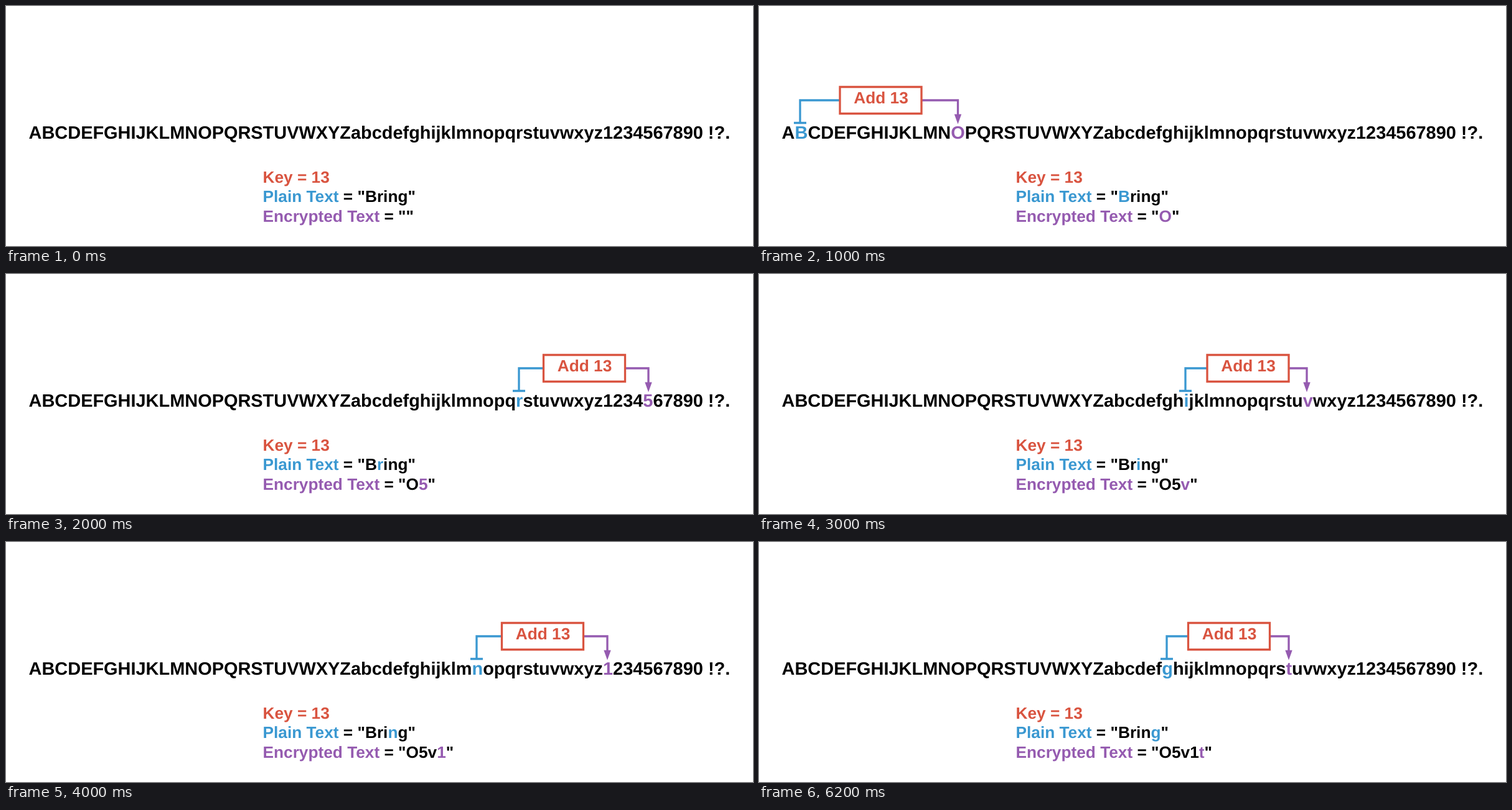
Recreate the animation shown at these times as an HTML page. Size 1200 by 387 pixels, loop 7 s.

```html
<!DOCTYPE html>
<html lang="en">
<head>
<meta charset="utf-8">
<title>Caesar cipher, key 13</title>
<style>
  :root { --red: #d95440; --blue: #3a98d1; --purple: #955bb0; }
  html, body { margin: 0; width: 100%; height: 100%; overflow: hidden; background: #fff; }
  svg { display: block; width: 100%; height: 100%; }
  text {
    font: bold 26.25px "Liberation Sans", Arial, sans-serif;
    text-rendering: geometricPrecision;
    white-space: pre;
  }
  .alphabet { font-size: 28.93px; }
  .red { fill: var(--red); }
  .blue { fill: var(--blue); }
  .purple { fill: var(--purple); }
  .line { fill: none; stroke-width: 3.3; }
  .line.red { stroke: var(--red); }
  .line.blue { stroke: var(--blue); }
  .line.purple { stroke: var(--purple); }
  .scene { visibility: hidden; animation: show 7s step-end infinite; }
  .scene:last-child { animation-name: hold; }
  @keyframes show { 0% { visibility: visible; } 14.28572%, 100% { visibility: hidden; } }
  @keyframes hold { 0% { visibility: visible; } 28.57143%, 100% { visibility: hidden; } }
</style>
</head>
<body>
<svg id="stage" viewBox="0 0 1200 387" preserveAspectRatio="none"></svg>
<script>
const ALPHABET = "ABCDEFGHIJKLMNOPQRSTUVWXYZabcdefghijklmnopqrstuvwxyz1234567890 !?.";
const KEY = 13;
const WORD = "Bring";
const LEFT = 412.5;

// Connector positions per letter: from, box left edge, to
const LINKS = [
  [66, 130, 319.5],
  [824, 863.5, 1032],
  [685, 720, 880],
  [756, 796.5, 966],
  [655, 689.5, 851]
];

const shift = c => ALPHABET[(ALPHABET.indexOf(c) + KEY) % ALPHABET.length];
const span = (color, s) => `<tspan class="${color}">${s}</tspan>`;
const text = (x, y, s, cls = "") => `<text x="${x}" y="${y}" class="${cls}">${s}</text>`;
const line = (color, d) => `<path class="line ${color}" d="${d}"/>`;

function mark(s, colors) {
  return [...s].map((c, i) => colors[i] ? span(colors[i], c) : c).join("");
}

function link([from, box, to]) {
  return line("blue", `M${box} 152H${from}V188.5M${from - 10} 188.5h20`) +
    line("purple", `M${box + 131} 152H${to}V176`) +
    `<path class="purple" d="M${to - 5.7} 174.5h11.4l-5.7 16z"/>` +
    line("red", `M${box} 130.5h131v43h-131z`) +
    text(box + 22.3, 157, "Add " + KEY, "red");
}

function scene(n) {
  const i = n - 1;
  const letters = {}, plain = {}, secret = {};
  if (n) {
    const at = ALPHABET.indexOf(WORD[i]);
    letters[at] = plain[i] = "blue";
    letters[at + KEY] = secret[i] = "purple";
  }
  const cipher = [...WORD.slice(0, n)].map(shift).join("");
  return `<g class="scene" style="animation-delay:${n - 7}s">` +
    text(36.6, 213.8, mark(ALPHABET, letters), "alphabet") +
    text(LEFT, 285, "Key = " + KEY, "red") +
    text(LEFT, 316.3, `${span("blue", "Plain Text")} = "${mark(WORD, plain)}"`) +
    text(LEFT, 347.7, `${span("purple", "Encrypted Text")} = "${mark(cipher, secret)}"`) +
    (n ? link(LINKS[i]) : "") + "</g>";
}

document.getElementById("stage").innerHTML =
  Array.from({ length: WORD.length + 1 }, (_, n) => scene(n)).join("");
</script>
</body>
</html>
```
